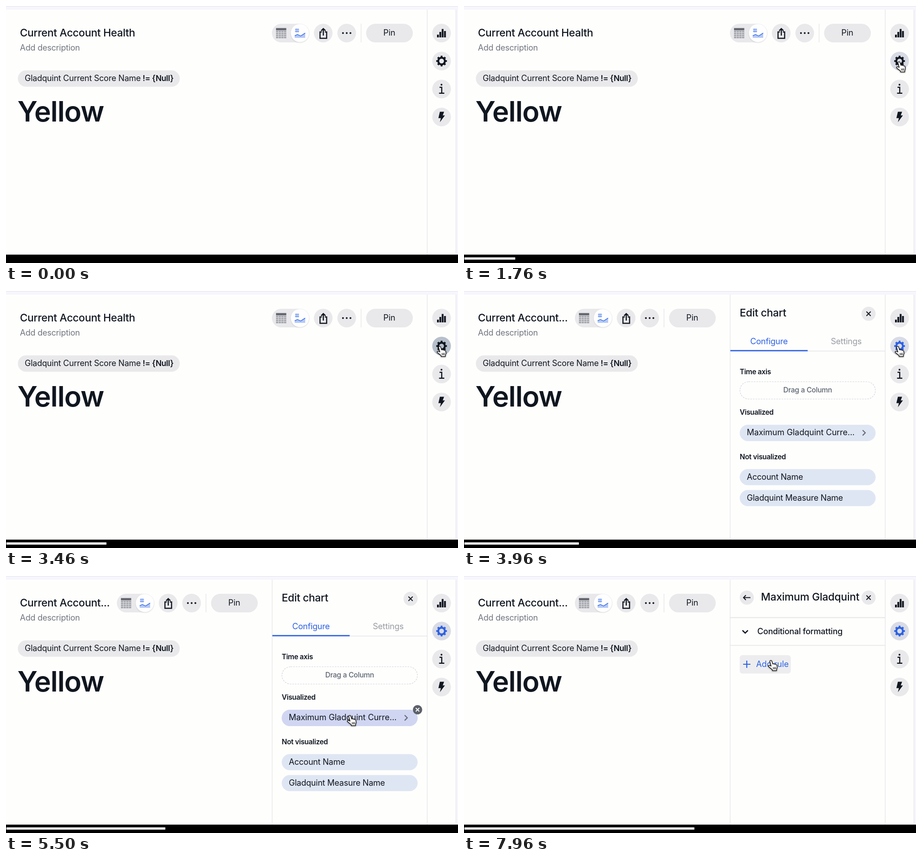
An HTML page that plays this animation: 991 px wide and 565 px high, repeating every 8 s.

```html
<!DOCTYPE html>
<html lang="en">
<head>
<meta charset="utf-8">
<title>Edit chart</title>
<style>
html, body { margin: 0; width: 100%; height: 100%; overflow: hidden; background: #fefefd; }
svg { display: block; width: 100%; height: 100%; }
text { font: 400 18px Inter, "Open Sans", sans-serif; letter-spacing: -.22px; fill: #10161f; white-space: pre; }
.h { font-size: 23px; font-weight: 500; letter-spacing: -.32px; }
.label { font-size: 15.5px; font-weight: 600; letter-spacing: -.35px; }
.hint { font-size: 15.5px; font-weight: 500; fill: #5b626e; }
.big { font-size: 62px; font-weight: 600; letter-spacing: -1.1px; }
.mid { text-anchor: middle; }
.btn { fill: #e9e9ec; }
.chip { fill: #dfe6f3; }
.rule { stroke: #e5e5e8; stroke-width: 1.3; }
.ink { fill: none; stroke: #10161f; stroke-width: 2; }
.bold { stroke-width: 2.5; }
.blue { fill: #2c61e3; }

/* every part shares one 8 s clock */
.closed, .edit, .detail, .tools, .gear, .gear-bg, .hover-chip, .hover-rule, .arrow, .hand {
  animation: 8s step-end infinite;
}
.closed { animation-name: closed; }
.edit { animation-name: edit; }
.detail { animation-name: detail; }
.tools { animation-name: tools; }
.gear { animation-name: gear; }
.gear-bg { animation-name: gear-bg; }
.hover-chip { animation-name: hover-chip; }
.hover-rule { animation-name: hover-rule; }
.arrow { animation-name: arrow; }
.hand { animation-name: hand; }
.cursor { animation: travel 8s linear infinite; filter: drop-shadow(0 1.5px 1.5px #0006); }
.bar { transform-origin: 1px 0; animation: fill 8s linear infinite; }

@keyframes closed { 0% { opacity: 1 } 45%, 100% { opacity: 0 } }
@keyframes edit { 0% { opacity: 0 } 45% { opacity: 1 } 77.5%, 100% { opacity: 0 } }
@keyframes detail { 0% { opacity: 0 } 77.5%, 100% { opacity: 1 } }
@keyframes tools { 0% { transform: none } 45%, 100% { transform: translateX(-340px) } }
@keyframes gear { 0% { stroke: #10161f } 45%, 100% { stroke: #2c61e3 } }
@keyframes gear-bg {
  0% { fill: #e9e9ec } 20% { fill: #d8dae4 } 42% { fill: #b7bfcb } 45%, 100% { fill: #d9dbe5 }
}
@keyframes hover-chip { 0% { opacity: 0 } 65% { opacity: 1 } 77.5%, 100% { opacity: 0 } }
@keyframes hover-rule { 0% { opacity: 0 } 91.5%, 100% { opacity: 1 } }
@keyframes arrow {
  0% { opacity: 1 } 20% { opacity: 0 } 54.5% { opacity: 1 } 65% { opacity: 0 }
  77.5% { opacity: 1 } 91.5%, 100% { opacity: 0 }
}
@keyframes hand {
  0% { opacity: 0 } 20% { opacity: 1 } 54.5% { opacity: 0 } 65% { opacity: 1 }
  77.5% { opacity: 0 } 91.5%, 100% { opacity: 1 }
}
@keyframes travel {
  0%, 14% { transform: translate(1002px, 165px); animation-timing-function: ease-out }
  21.5%, 36% { transform: translate(954px, 122px) }
  40%, 53% { transform: translate(951px, 121px); animation-timing-function: ease-in }
  58.25% { transform: translate(845px, 183px) }
  62.9% { transform: translate(795px, 262px); animation-timing-function: ease-out }
  67.5% { transform: translate(754px, 306px) }
  86% { transform: translate(754px, 305px); animation-timing-function: ease-in-out }
  94%, 100% { transform: translate(673px, 185px) }
}
@keyframes fill { from { transform: scaleX(0) } to { transform: scaleX(1) } }
</style>
</head>
<body>
<svg viewBox="0 0 991 565" preserveAspectRatio="none">
  <defs>
    <g id="close"><circle class="btn" r="15.5"/><path class="ink" d="M-4.7-4.7 4.7 4.7M4.7-4.7-4.7 4.7"/></g>
  </defs>

  <rect width="991" height="565" fill="#f6f6fc"/>
  <path d="M0 .5H991" stroke="#e4e4ee"/>
  <rect y="8" width="986" height="539" fill="#fefefd"/>
  <path class="rule" d="M923.5 8V547M986.5 8V547"/>

  <!-- chart header and value -->
  <text class="h closed" x="30.5" y="67">Current Account Health</text>
  <g class="edit"><text class="h" x="30.5" y="67">Current Account...</text></g>
  <g class="detail"><text class="h" x="30.5" y="67">Current Account...</text></g>
  <text x="30.5" y="98" style="fill:#70757d">Add description</text>
  <rect class="btn" x="26" y="141.5" width="355" height="36" rx="18"/>
  <text x="41" y="164.5">Gladquint Current Score Name</text>
  <text x="299.5" y="164.5" style="font-weight:600;font-size:17.5px;letter-spacing:-.4px">!= {Null}</text>
  <text class="big" x="25" y="253.5">Yellow</text>

  <g class="tools">
    <rect class="btn" x="583" y="39" width="82" height="41" rx="20.5"/>
    <circle cx="644.5" cy="59.5" r="20" fill="#fefefe" style="filter:drop-shadow(0 1px 1px #0002)"/>
    <path d="M592 48.500h22.500v5H592z" fill="#63666f"/>
    <path d="M592 54.500h22.500v16.500H592z" fill="#a5a7ad"/>
    <path d="M592 58.500h22.500M592 62.700h22.500M592 66.900h22.500M597.500 54.500v16.500M603.200 54.500v16.500M608.900 54.500v16.500" stroke="#e0e0e4"/>
    <path d="M636.2 49V58.500M640 49V58.500M633.700 51.800h8.800M633.700 55.600h8.800" fill="none" stroke="#4a7be8" stroke-width="1.1"/>
    <path d="M633 65.500 639 62.500 646 66 656 59.500V70H633z" fill="#b5c9f6"/>
    <path d="M633 65.500 639 62.500 646 66 656 59.500" fill="none" stroke="#3f72e6" stroke-width="1.5"/>
    <circle class="btn" cx="695.5" cy="59.5" r="20.5"/>
    <path class="ink bold" d="M692.500 57H688.500V71H703V57H699M695.750 65V50M691 54.500 695.750 49.700 700.500 54.500"/>
    <circle class="btn" cx="747" cy="59.5" r="20.5"/>
    <g fill="#10161f"><circle cx="738.8" cy="59.5" r="2"/><circle cx="747" cy="59.5" r="2"/><circle cx="755.2" cy="59.5" r="2"/></g>
    <path class="rule" d="M778.500 39V80"/>
    <rect class="btn" x="789.5" y="39" width="102.5" height="41" rx="20.5"/>
    <text class="mid" x="840.5" y="65" style="letter-spacing:0">Pin</text>
  </g>

  <!-- side rail -->
  <g class="btn">
    <circle cx="955" cy="59.5" r="20.5"/>
    <circle class="gear-bg" cx="955" cy="121" r="20.5"/>
    <circle cx="955" cy="182.5" r="20.5"/>
    <circle cx="955" cy="244" r="20.5"/>
  </g>
  <path d="M945 69v-6h4v6zM950.200 69v-12h4v12zM955.300 69v-18.500h4v18.500zM960.400 69v-14h4v14z" fill="#10161f"/>
  <g class="gear" fill="none" transform="translate(955 121)">
    <circle r="7.3" stroke-width="4.2"/>
    <circle r="10" stroke-width="3.4" pathLength="16" stroke-dasharray="1" stroke-dashoffset=".5"/>
  </g>
  <path class="ink bold" d="M950.500 178.700H955.300V192M949.500 191.800H961"/>
  <circle cx="954.8" cy="173" r="2" fill="#10161f"/>
  <path d="M951.300 232.500H960.500L957.500 240.500H962.300L951.300 255.500 953.500 246.500H948z" fill="#10161f"/>

  <!-- chart settings panel -->
  <g class="edit">
    <path class="rule" d="M583.500 8V547M584 132H923"/>
    <text class="h" x="604.5" y="56">Edit chart</text>
    <use href="#close" x="887" y="50"/>
    <text class="mid" x="668.7" y="117" style="fill:#2c61e3">Configure</text>
    <text class="mid" x="838" y="117" style="fill:#989ba1">Settings</text>
    <path class="blue" d="M584 129.800h169.500v2.700H584z"/>
    <text class="label" x="604.5" y="182.5">Time axis</text>
    <rect x="605" y="199.5" width="297" height="38" rx="19" fill="none" stroke="#d3d4d9" stroke-width="1.2" stroke-dasharray="3.5 2.2"/>
    <text class="hint mid" x="753.5" y="223">Drag a Column</text>
    <text class="label" x="604.5" y="272">Visualized</text>
    <rect class="chip" x="604.5" y="294" width="298" height="36" rx="18"/>
    <g class="hover-chip">
      <rect x="604.5" y="294" width="298" height="36" rx="18" fill="#d0d6f1"/>
      <circle cx="902.3" cy="294" r="10.3" fill="#5d616a"/>
      <path d="M898.500 290.200l7.600 7.600M906.100 290.200l-7.600 7.600" stroke="#fff" stroke-width="2"/>
    </g>
    <text x="620" y="317" style="letter-spacing:-.05px">Maximum Gladquint Curre...</text>
    <path d="M874 306l5.800 5.800-5.800 5.800" fill="none" stroke="#646a76" stroke-width="2.2"/>
    <text class="label" x="604.5" y="369.5">Not visualized</text>
    <rect class="chip" x="604.5" y="391.5" width="298" height="35.5" rx="17.75"/>
    <text x="620" y="414.5">Account Name</text>
    <rect class="chip" x="604.5" y="437.5" width="298" height="35.5" rx="17.75"/>
    <text x="620" y="460.5">Gladquint Measure Name</text>
  </g>

  <!-- column formatting panel -->
  <g class="detail">
    <path class="rule" d="M583.500 8V547M584 152.500H923"/>
    <path class="rule" d="M584 91.500H923" style="stroke-width:2"/>
    <circle class="btn" cx="620" cy="47.5" r="15.5"/>
    <path class="ink" d="M628 47.500H613M618 42.300 612.800 47.500 618 52.700"/>
    <svg x="640" y="20" width="229" height="60"><text class="h" x="11" y="34" style="letter-spacing:-.2px">Maximum Gladquint</text></svg>
    <use href="#close" x="887" y="47.5"/>
    <path class="ink bold" d="M610.500 119.500 616.500 125.500 622.500 119.500"/>
    <text x="643" y="127.5" style="font-weight:500">Conditional formatting</text>
    <rect class="hover-rule" x="604.5" y="174" width="112" height="40.5" rx="6" fill="#ededef"/>
    <path d="M612 194h16M620 186v16" stroke="#2c61e3" stroke-width="2.2"/>
    <text x="640.5" y="199.5" style="fill:#2c61e3;letter-spacing:-.05px">Add rule</text>
  </g>

  <rect y="546.6" width="991" height="18.4"/>
  <rect class="bar" x="1" y="552.6" width="506.5" height="5" fill="#fff"/>

  <g class="cursor" stroke-linejoin="round">
    <path class="arrow" d="M0 0V19l4.400-4 3.200 8 3.700-1.500-3.300-7.800h6z" fill="#111" stroke="#fff" stroke-width="1.4"/>
    <g class="hand" stroke="#1b1b1b" stroke-width="1.5">
      <path fill="#fff" d="M-2.500 3C-2.500 0 1 0 1.800 2L4 8.500C5 7.400 6.800 7.600 7.300 9 8.300 8 10 8.400 10.400 9.900 11.700 9.200 13 10.200 13.200 11.800L13.700 16 12.400 20V23H3V21C.5 18.500-2 17-5 14.500-6.500 12.800-5 11-3 11.600L.3 13z"/>
      <path fill="none" stroke-width="1.2" d="M4.800 15.500 5.400 20M7.400 15.200 7.800 20M10 15V20"/>
    </g>
  </g>
</svg>
</body>
</html>
```
